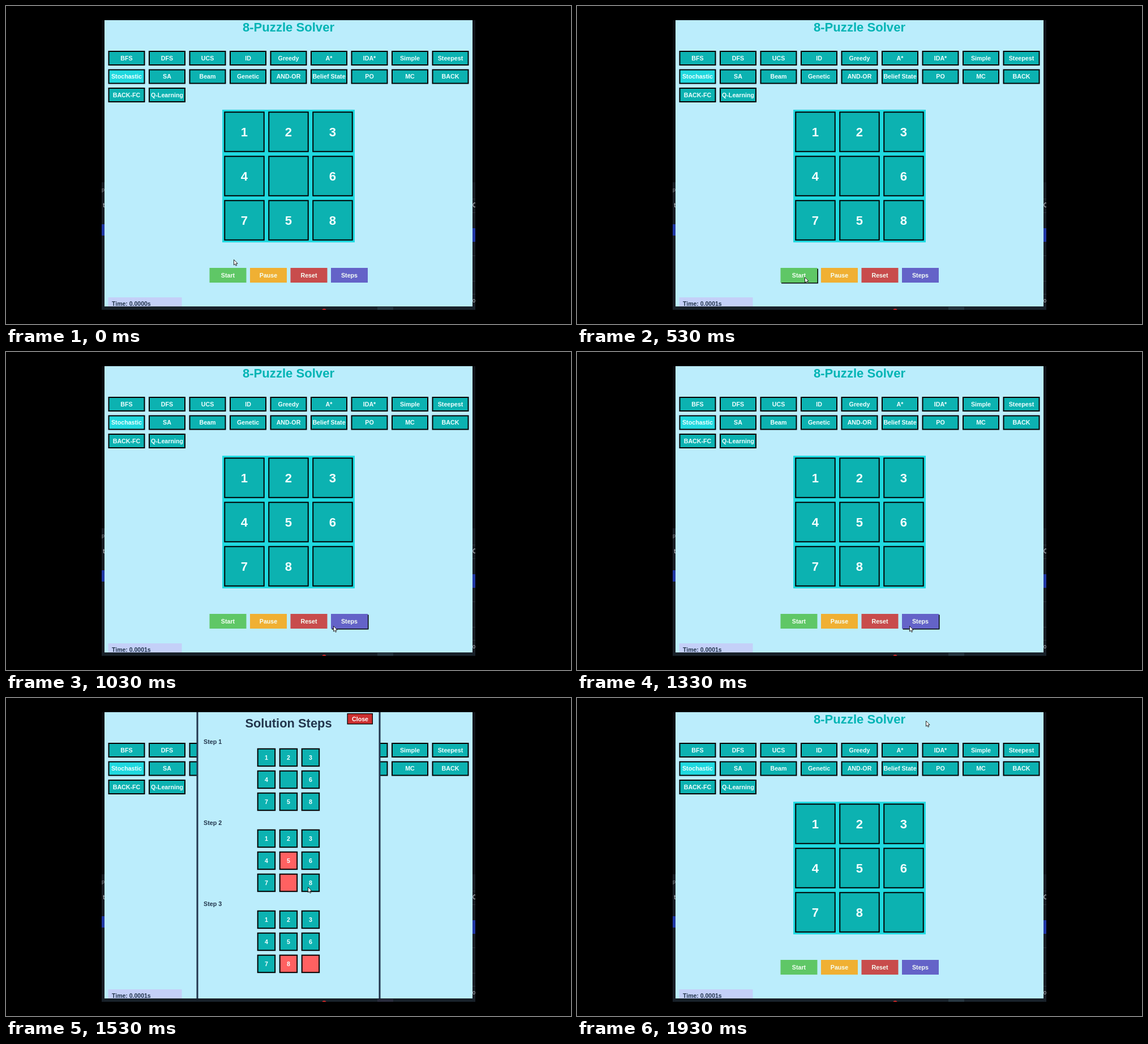
These frames come from a looping animation (998x561 px, 1.96 s). An HTML page with a canvas:

```html
<!DOCTYPE html>
<html lang="en">
<head>
<meta charset="utf-8">
<title>8-Puzzle Solver</title>
<style>
html, body { margin: 0; width: 100%; height: 100%; overflow: hidden; background: #000; }
canvas { display: block; }
</style>
</head>
<body>
<canvas id="stage" width="998" height="561"></canvas>
<script>
const ctx = document.getElementById('stage').getContext('2d');
const LOOP = 1960, TICK = 100 / 3;
const UNIT = 0.65; // window scale
const SMALL = 10.7, LARGE = 22.1;
const BG = '#bbedfc', TEAL = '#0cb2b1', CYAN = '#20d9df', INK = '#22354c', RED = '#ff6161';

const ALGOS = ['BFS', 'DFS', 'UCS', 'ID', 'Greedy', 'A*', 'IDA*', 'Simple', 'Steepest',
  'Stochastic', 'SA', 'Beam', 'Genetic', 'AND-OR', 'Belief State', 'PO', 'MC', 'BACK',
  'BACK-FC', 'Q-Learning'];
const CONTROLS = [['Start', '#5fc766'], ['Pause', '#f0b033'], ['Reset', '#c84c4c'], ['Steps', '#6463c8']];
const STATES = ['1234 6758', '1234567 8', '12345678 '];

const SOLVE = 460, MOVE_1 = 660, MOVE_2 = 830, OPEN = 1395, CLOSE = 1860;

// time, x, y of the pointer tip
const PATH = [
  [0, 402, 447], [300, 402, 478], [640, 402, 478], [960, 572, 482], [1030, 578, 483],
  [1130, 587, 483], [1410, 587, 483], [1530, 533, 333], [1725, 616, 54],
  [1770, 616, 49], [1830, 616, 40], [LOOP, 616, 40]
];

function rect(x, y, w, h, color) {
  ctx.fillStyle = color;
  ctx.fillRect(x, y, w, h);
}

function box(x, y, w, h, fill, line = 2, edge = '#000') {
  rect(x, y, w, h, edge);
  rect(x + line, y + line, w - 2 * line, h - 2 * line, fill);
}

function text(str, x, y, size, color, align = 'center', weight = 'bold') {
  ctx.font = `${weight} ${size}px "Liberation Sans", Arial, sans-serif`;
  ctx.textAlign = align;
  ctx.fillStyle = color;
  ctx.fillText(str, x, y + size * 0.36);
}

function pointerAt(t) {
  let i = 1;
  while (i < PATH.length - 1 && PATH[i][0] < t) i++;
  const [t0, x0, y0] = PATH[i - 1], [t1, x1, y1] = PATH[i];
  const k = (t - t0) / (t1 - t0), e = k * k * (3 - 2 * k);
  return [Math.round(x0 + (x1 - x0) * e), Math.round(y0 + (y1 - y0) * e)];
}

function drawDesktop(open) {
  rect(0, 0, 998, 561, '#000');
  rect(169, 25, 660, 511, '#1a1e25');
  rect(169, 25, 5, 286, '#09090d');
  rect(824, 25, 5, 286, '#12141a');
  rect(169, 385, 5, 20, '#2036a4');
  rect(824, 392, 5, 24, '#2036a4');
  for (const y of [340, 364, 440, 485, 508]) {
    rect(824, y, 5, 1, '#30343b');
  }
  rect(169, 530, 660, 6, '#182129');
  rect(656, 531, 28, 5, open ? '#292b3c' : '#263640');
  ctx.save();
  ctx.beginPath();
  ctx.rect(169, 25, 660, 511);
  ctx.clip();
  text('op', 174, 324, 9, '#92969b', 'right', 'normal');
  text('t', 174, 351, 10, '#e0e2e5', 'right', 'normal');
  text('C', 824, 351, 10, '#e0e2e5', 'left', 'normal');
  text('0', 824, 520, 9, '#c9ccd0', 'left', 'normal');
  ctx.fillStyle = '#df2929';
  ctx.beginPath();
  ctx.arc(562, 538, 4, 0, 7);
  ctx.fill();
  ctx.restore();
}

function drawTiles(state, x, y, pitch, size, font, prev = state) {
  [...state].forEach((n, i) => {
    const tx = x + i % 3 * pitch, ty = y + Math.floor(i / 3) * pitch;
    box(tx, ty, size, size, n === prev[i] ? TEAL : RED);
    text(n, tx + size / 2, ty + size / 2, font, '#f2ffff');
  });
}

function drawMain(t, px, py, open) {
  rect(174, 25, 650, 505, BG);
  text('8-Puzzle Solver', 499, 37, LARGE, '#00b4b4');
  ALGOS.forEach((name, i) => {
    const x = 180.5 + i % 9 * 110 * UNIT, y = 79 + Math.floor(i / 9) * 50 * UNIT;
    box(x, y, 65, 26, name === 'Stochastic' ? CYAN : TEAL);
    text(name, x + 32.5, y + 13, SMALL, '#f0ffff');
  });

  rect(382, 183, 234, 234, CYAN);
  const state = STATES[t < MOVE_1 ? 0 : t < MOVE_2 ? 1 : 2];
  drawTiles(state, 385.25, 186.25, 78, 71.5, LARGE);

  CONTROLS.forEach(([name, color], i) => {
    const x = 359.5 + i * 110 * UNIT, y = 462;
    const over = !open && px >= x && px < x + 65 && py >= y && py < y + 26;
    if (over) rect(x + 1.5, y + 1.5, 65, 26, '#000');
    rect(x, y, 65, 26, color);
    text(name, x + 32.5, y + 13, SMALL, '#f5fff5');
  });

  rect(180.5, 514, 130, 16, '#c4d0f8');
  ctx.save();
  ctx.beginPath();
  ctx.rect(174, 25, 650, 505);
  ctx.clip();
  text(t < SOLVE ? 'Time: 0.0000s' : 'Time: 0.0001s', 187, 525, 10.5, INK, 'left');
  ctx.restore();
}

function drawDialog() {
  rect(336.5, 25, 325, 505, INK);
  rect(339.5, 25, 319, 505, BG);
  text('Solution Steps', 499, 44, 21.9, INK);
  box(602.5, 27, 45.5, 19.5, '#cd3030', 1.3);
  text('Close', 625.5, 36.7, SMALL, '#fff');
  STATES.forEach((state, i) => {
    const y = 77.5 + i * 220 * UNIT;
    text('Step ' + (i + 1), 349, y, SMALL, INK, 'left');
    drawTiles(state, 443.7, y + 11.2, 39, 32.5, SMALL, STATES[Math.max(0, i - 1)]);
  });
}

function drawPointer(x, y) {
  const pts = [[0, 0], [0, 9.5], [2.1, 7.6], [3.6, 10.8], [5.1, 10], [3.7, 7], [6.6, 6.8]];
  ctx.beginPath();
  pts.forEach(([dx, dy]) => ctx.lineTo(x + 0.5 + dx, y + 0.5 + dy));
  ctx.closePath();
  ctx.fillStyle = '#fff';
  ctx.strokeStyle = '#111';
  ctx.lineWidth = 0.9;
  ctx.fill();
  ctx.stroke();
}

function draw(ms) {
  const t = Math.floor((ms % LOOP + 5) / TICK) * TICK;
  const open = t >= OPEN && t < CLOSE;
  const [px, py] = pointerAt(Math.min(t, LOOP));
  drawDesktop(open);
  drawMain(t, px, py, open);
  if (open) drawDialog();
  drawPointer(px, py);
}

let start;
function frame(now) {
  start ??= now;
  draw(Math.max(0, now - start));
  requestAnimationFrame(frame);
}
draw(0);
requestAnimationFrame(frame);
</script>
</body>
</html>
```
